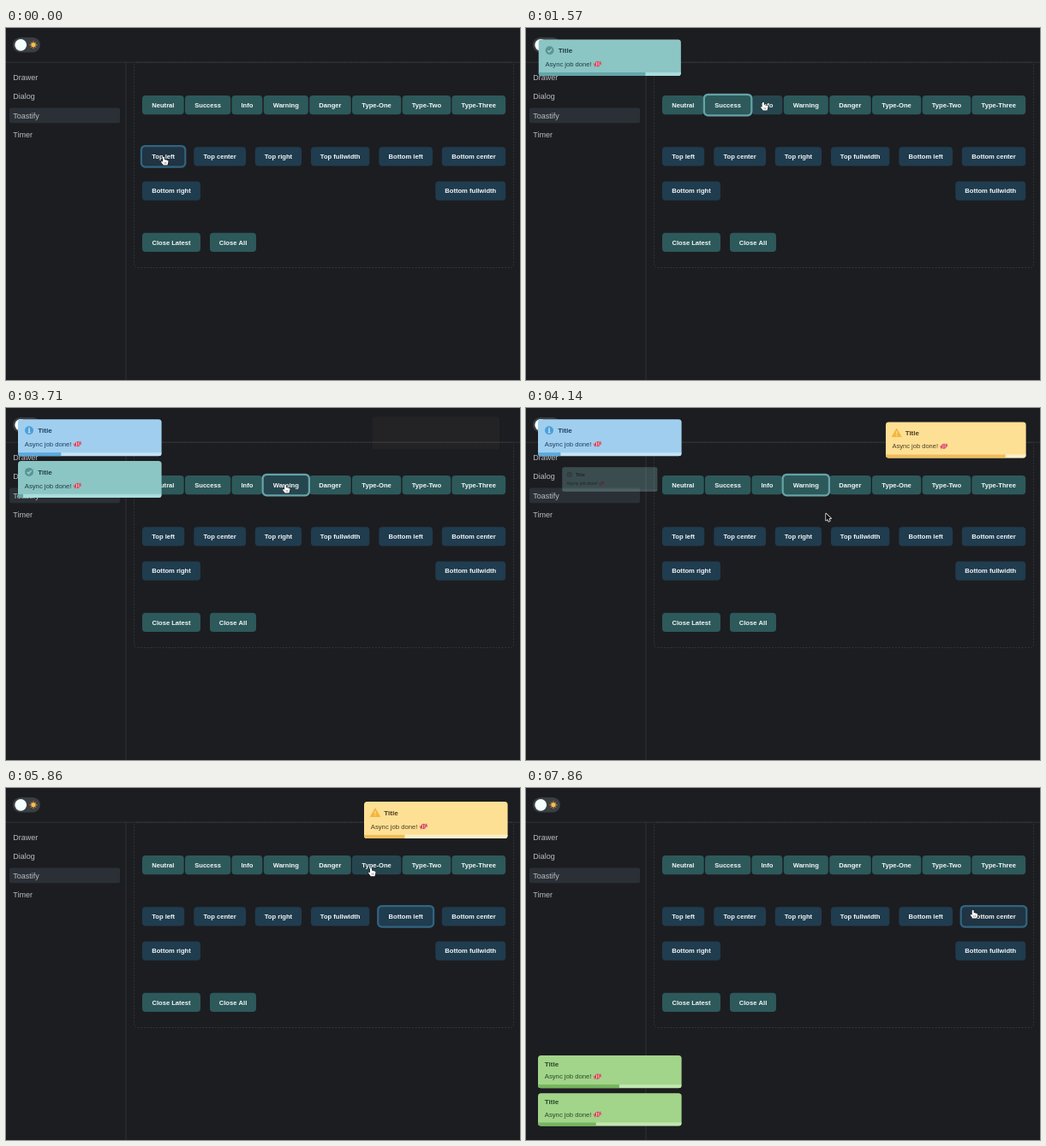
Write an HTML page with a canvas that moves like this. It is 600x412 px and loops after 8000 ms.

```html
<!DOCTYPE html>
<html lang="en">
<head>
<meta charset="utf-8">
<title>Toast demo</title>
<style>
  html, body { margin: 0; width: 100%; height: 100%; overflow: hidden; background: #1c1d21; }
  canvas { display: block; width: 600px; height: 412px; }
</style>
</head>
<body>
<canvas id="stage"></canvas>
<script>
const W = 600, H = 412, LOOP = 8000, STEP = LOOP / 56, LIFE = 3000, EXIT = 400;
const FONT = '"Liberation Sans", Arial, sans-serif';
const dpr = window.devicePixelRatio || 1;

const stage = document.getElementById('stage');
const layer = document.createElement('canvas');
for (const c of [stage, layer]) { c.width = W * dpr; c.height = H * dpr; }
const screen = stage.getContext('2d'), sheet = layer.getContext('2d');
let g = screen;

// label, left, right
const row = (y, tone, items) => items.map(([label, x, r]) => ({ label, x, y, w: r - x, h: 22.3, tone }));
const buttons = [
  ...row(78.9, 'teal', [['Neutral', 159, 207.7], ['Success', 209, 262.2], ['Info', 263.5, 299.3],
    ['Warning', 300.8, 352.8], ['Danger', 354.2, 402.7], ['Type-One', 404, 461.2],
    ['Type-Two', 462.6, 519.2], ['Type-Three', 520.4, 583.2]]),
  ...row(139.2, 'blue', [['Top left', 159, 208.2], ['Top center', 219.3, 280], ['Top right', 290.8, 345],
    ['Top fullwidth', 356, 424.3], ['Bottom left', 435.3, 498], ['Bottom center', 508.8, 583.2]]),
  ...row(179.5, 'blue', [['Bottom right', 159, 227], ['Bottom fullwidth', 501.3, 583.2]]),
  ...row(239.8, 'teal', [['Close Latest', 159, 227], ['Close All', 238, 292]])
];
const tones = {
  teal: { fill: '#2d595b', hover: '#26464f', ring: '#65a3a6' },
  blue: { fill: '#203c4f', hover: '#203443', ring: '#316480' }
};

const focusLog = [[0, 'Top left'], [815, 'Success'], [1610, 'Info'], [2780, 'Top right'],
  [3700, 'Warning'], [5300, 'Bottom left'], [6060, 'Type-One'], [7550, 'Bottom center']];

const pointerPath = [[0, 184, 151], [140, 184, 151], [620, 235, 88], [900, 236, 88], [1400, 277, 87],
  [1650, 277, 87], [2430, 288.5, 147], [2650, 315, 150], [2900, 316, 150], [3450, 326, 90],
  [3850, 326, 90], [4400, 370, 151], [4710, 390, 157.5], [5150, 465, 152], [5450, 465, 152],
  [5900, 425, 92], [6800, 425, 92], [7400, 520, 143], [8000, 522, 143]];

const popScale = [[0, .88], [140, 1.19], [310, .97], [620, .988], [1000, 1]];

const kinds = {
  success: { bg: '#8bc5c4', bar: '#64a6a8', rest: '#aadcdc', ink: '#1e3d45', icon: '#5b9496' },
  info: { bg: '#a0ceee', bar: '#5aa9de', rest: '#c3e2f6', ink: '#1d3f62', icon: '#4ba0da' },
  warning: { bg: '#fee095', bar: '#f0bd59', rest: '#fdf0cb', ink: '#4b3d22', icon: '#f4b640' },
  plain: { bg: '#a2d48a', bar: '#74b65d', rest: '#c1e6b0', ink: '#2a4a27' }
};
const toasts = [
  { kind: 'success', start: 822, x: 14, y: 13.3, h: 43, push: [1615, 48.7] },
  { kind: 'info', start: 1615, x: 14, y: 13.3, h: 43 },
  { kind: 'warning', start: 3705, x: 418, y: 16, h: 43 },
  { kind: 'plain', start: 6070, x: 14, y: 357.2, h: 38.4 },
  { kind: 'plain', start: 6555, x: 14, y: 312.9, h: 38.4 }
];

const clamp = v => Math.max(0, Math.min(1, v));
const smooth = p => p * p * (3 - 2 * p);

// Eased value between [time, ...values] keys
function along(keys, t) {
  let i = 0;
  while (i < keys.length - 2 && t >= keys[i + 1][0]) i++;
  const a = keys[i], b = keys[i + 1];
  const p = smooth(clamp((t - a[0]) / (b[0] - a[0])));
  return a.slice(1).map((v, k) => v + (b[k + 1] - v) * p);
}

function box(x, y, w, h, r, fill) {
  g.beginPath();
  g.roundRect(x, y, w, h, r);
  g.fillStyle = fill;
  g.fill();
}

function disc(x, y, r, fill) {
  g.beginPath();
  g.arc(x, y, r, 0, 7);
  g.fillStyle = fill;
  g.fill();
}

function line(points, color, width) {
  g.beginPath();
  points.forEach(([x, y]) => g.lineTo(x, y));
  g.strokeStyle = color;
  g.lineWidth = width;
  g.stroke();
}

function write(s, x, y, size, color, weight = 400, align = 'left') {
  g.font = `${weight} ${size}px ${FONT}`;
  g.textAlign = align;
  g.fillStyle = color;
  g.fillText(s, x, y);
}

function drawShell() {
  g.fillStyle = '#1c1d21';
  g.fillRect(0, 0, W, H);
  g.fillStyle = '#303236';
  g.fillRect(0, 39.6, W, 1);
  g.fillRect(139.5, 40, 1, H - 40);

  g.setLineDash([2, 1.6]);
  g.strokeStyle = '#393c40';
  g.lineWidth = .8;
  g.beginPath();
  g.roundRect(149.6, 40.2, 443, 240.3, 4);
  g.stroke();
  g.setLineDash([]);

  box(8, 11, 32, 17.6, 8.8, '#3a3f44');
  disc(17.2, 19.8, 6.9, '#f5fffc');
  for (let i = 0; i < 8; i++) {
    const c = Math.cos(i * Math.PI / 4), s = Math.sin(i * Math.PI / 4);
    line([[32 + c * 3, 19.8 + s * 3], [32 + c * 4.6, 19.8 + s * 4.6]], '#d98d35', 1);
  }
  disc(32, 19.8, 2.7, '#f8bd4b');

  box(4, 93.5, 129, 17.8, 2, '#2a3036');
  ['Drawer', 'Dialog', 'Toastify', 'Timer'].forEach((s, i) => write(s, 8.3, 60.9 + i * 22.4, 9, '#b9bdc1'));
}

const over = (b, [x, y]) => x >= b.x && x <= b.x + b.w && y >= b.y && y <= b.y + b.h;

function drawButton(b, focused, hovered) {
  const tone = tones[b.tone];
  if (focused) box(b.x - 2.2, b.y - 2.2, b.w + 4.4, b.h + 4.4, 5.5, tone.ring);
  box(b.x, b.y, b.w, b.h, 4, hovered ? tone.hover : tone.fill);
  write(b.label, b.x + b.w / 2, b.y + 13.9, 7.6, '#f3f6f6', 700, 'center');
}

function drawIcon(kind, x, y, color) {
  if (kind === 'warning') {
    g.beginPath();
    g.moveTo(x, y - 5);
    g.lineTo(x + 5.6, y + 4.6);
    g.lineTo(x - 5.6, y + 4.6);
    g.closePath();
    g.fillStyle = g.strokeStyle = color;
    g.lineWidth = 1;
    g.fill();
    g.stroke();
    line([[x, y - 1.8], [x, y + 1.5]], '#fee095', 1.2);
    disc(x, y + 3.2, .7, '#fee095');
    return;
  }
  disc(x, y, 5, color);
  if (kind === 'success') {
    line([[x - 2.3, y + .1], [x - .6, y + 1.8], [x + 2.5, y - 1.7]], '#a3d4d3', 1.3);
  } else {
    disc(x, y - 2.3, .8, '#d4eafa');
    line([[x - 1, y - .6], [x + .1, y - .6], [x + .1, y + 2.6]], '#d4eafa', 1.2);
    line([[x - 1.3, y + 2.6], [x + 1.5, y + 2.6]], '#d4eafa', .9);
  }
}

function drawCandy(x, y) {
  g.save();
  g.translate(x, y);
  g.rotate(-.35);
  for (const s of [-1, 1]) {
    g.beginPath();
    g.moveTo(s * 1.8, 0);
    g.lineTo(s * 4.6, -2.5);
    g.lineTo(s * 4.2, 2.5);
    g.fillStyle = '#d9556c';
    g.fill();
  }
  disc(0, 0, 3, '#d83d52');
  line([[-1.7, 1.8], [-.2, -2.4]], '#f6c6cc', .9);
  line([[.6, 2.2], [1.9, -1.5]], '#f6c6cc', .9);
  g.restore();
}

function drawToast(o, t) {
  const age = t - o.start;
  if (age < 0 || age > LIFE + EXIT) return;
  const k = kinds[o.kind], w = 167.6, top = o.y < 100;
  const fade = clamp(age / 310), out = clamp((age - LIFE) / EXIT);
  const scale = along(popScale, age)[0] * (1 - .42 * out);
  const y = o.y + (o.push && t >= o.push[0] ? o.push[1] : 0);
  const lift = top ? -8.5 * (1 - fade) : 0;

  g = sheet;
  g.setTransform(dpr, 0, 0, dpr, 0, 0);
  g.clearRect(0, 0, W, H);
  g.translate(o.x + w / 2, y + o.h / 2 + lift);
  g.scale(scale, scale);
  g.translate(-w / 2, -o.h / 2);
  box(0, 0, w, o.h, 3.5, k.bg);
  g.save();
  g.clip();
  g.globalAlpha = fade ** 3;
  g.fillStyle = k.rest;
  g.fillRect(0, o.h - 4.2, w, 4.2);
  g.fillStyle = k.bar;
  g.fillRect(0, o.h - 4.2, w * clamp(1 - age / LIFE), 4.2);
  if (k.icon) drawIcon(o.kind, 13, 12.9, k.icon);
  write('Title', k.icon ? 23.3 : 7.8, top ? 15.7 : 13, 8.1, k.ink, 700);
  const base = top ? 31.6 : 27.4;
  write('Async job done!', 7.8, base, 7.7, k.ink);
  drawCandy(69.5, base - 2.7);
  g.restore();

  g = screen;
  g.save();
  g.globalAlpha = fade * (1 - out * .9) * (out < 1 ? 1 : 0);
  g.drawImage(layer, 0, 0, W, H);
  g.restore();
}

const arrow = 'M0 0V8.2L1.9 6.5 3.2 9.4 4.7 8.7 3.4 5.9H6Z';
const hand = 'M-1 .4Q0-.8 1 .4V3.2L2 3 2.6 3.6 3.6 3.4 4.1 4.1Q5.6 3.8 5.5 5.2L4.9 8 4.4 9.6H-.2L-2.8 6.2Q-3.2 4.9-1.9 5L-1 5.8Z';

function drawPointer([x, y], pointing) {
  const shape = new Path2D(pointing ? hand : arrow);
  g.save();
  g.translate(x, y);
  g.lineJoin = 'round';
  g.fillStyle = pointing ? '#fff' : '#111';
  g.strokeStyle = pointing ? '#111' : '#fff';
  g.lineWidth = pointing ? 1 : 1.4;
  g.stroke(shape);
  g.fill(shape);
  if (pointing) {
    line([[1.1, 6], [1.1, 8.3]], '#444', .5);
    line([[2.7, 6], [2.7, 8.3]], '#444', .5);
  }
  g.restore();
}

function render(t) {
  g = screen;
  g.setTransform(dpr, 0, 0, dpr, 0, 0);
  drawShell();
  const tip = along(pointerPath, t);
  const focus = focusLog.filter(([at]) => at <= t).pop()[1];
  for (const b of buttons) if (b.label !== focus) drawButton(b, false, over(b, tip));
  const active = buttons.find(b => b.label === focus);
  drawButton(active, true, over(active, tip));
  toasts.forEach(o => drawToast(o, t));
  drawPointer(tip, buttons.some(b => over(b, tip)));
}

let began;
function tick(now) {
  began ??= now;
  const t = (now - began) % LOOP;
  render(Math.floor((t + 6) / STEP) % 56 * STEP);
  requestAnimationFrame(tick);
}
requestAnimationFrame(tick);
</script>
</body>
</html>
```
